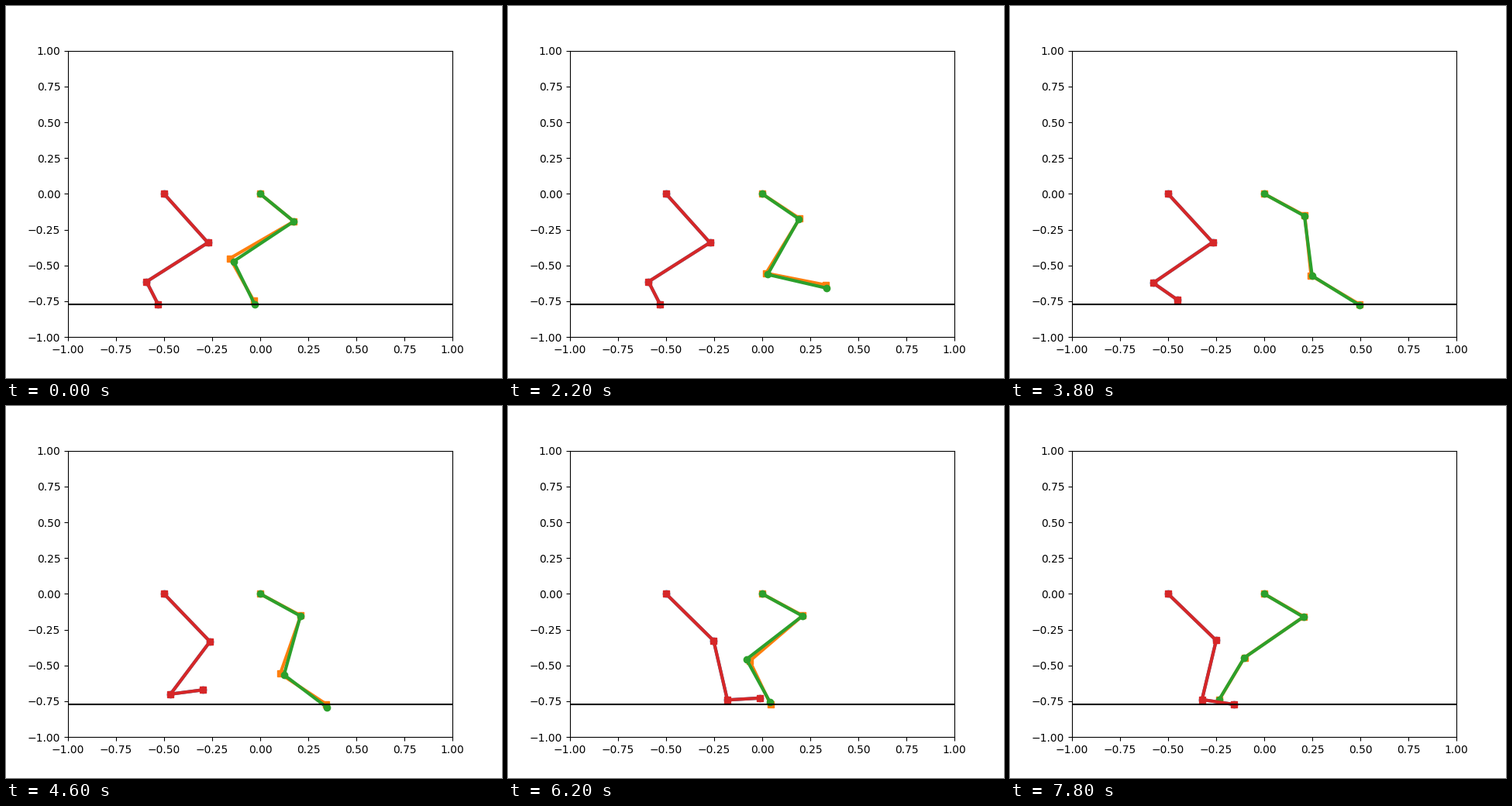
Write a matplotlib script that moves like this. It is 640 by 480 pixels and loops after 8 s.

```python
import numpy as np
import matplotlib.pyplot as plt
from matplotlib.animation import FuncAnimation

STEP = 200          # ms per frame
FRAMES = 40
GROUND = -0.77

FRONT_HIP, FRONT_LINKS = 0.0, (0.26, 0.42, 0.32)
HIND_HIP, HIND_LINKS = -0.5, (0.41, 0.42, 0.17)


def progress(t, start, end):
    return np.clip((t - start) / (end - start), 0, 1)


def smooth(u):
    return u * u * (3 - 2 * u)


def lift(t, start, end, height):
    return height * np.sin(np.pi * progress(t, start, end))


def front_foot(t):
    """Swing forward along an arc, then slide back on the ground."""
    swing = -0.034 + np.sin(0.186 * (t - 0.2))
    stance = 0.494 - 0.188 * (t - 3.8)
    return min(swing, stance), GROUND + lift(t, 0, 3.6, 0.143)


def fitted_foot(t):
    """The front foot with a small tracking error."""
    x, y = front_foot(t)
    sag = np.interp(t, (0.2, 2.2, 3.8, 4.5, 5.2, 6.2, 7.8),
                    (0.027, 0.022, 0.007, 0.025, 0.015, -0.017, 0))
    return x + 0.2 * sag, y - sag


def hind_foot(t):
    swing = -0.531 + np.sin(0.195 * max(t - 3.4, 0))
    stance = -0.157 - 0.188 * (t - 7.8)
    return min(swing, stance), GROUND - 0.002 + lift(t, 3.5, 6.6, 0.113)


def front_thigh(t, start=0.5, swing=12):
    return (-47.7 + swing * smooth(progress(t, start, 3.8))
            - 2 * smooth(progress(t, 6.2, 7.8)))


def fitted_thigh(t):
    return front_thigh(t, 0.8, 11.3)


def hind_thigh(t):
    return -56.2 + 3.8 * (1 - (1 - progress(t, 3.4, 7.8)) ** 2)


def solve(hip, links, thigh, foot):
    """Joints from hip to foot; the lower two links reach for the foot."""
    a, b, c = links
    hip = np.array([hip, 0.0])
    knee = hip + a * np.array([np.cos(thigh), np.sin(thigh)])
    dx, dy = foot - knee
    aim = np.arctan2(dy, dx)
    d = min(np.hypot(dx, dy), 0.98 * (b + c))
    shank = aim - np.arccos((d * d + b * b - c * c) / (2 * d * b))
    ankle = knee + b * np.array([np.cos(shank), np.sin(shank)])
    end = knee + d * np.array([np.cos(aim), np.sin(aim)])
    return np.array([hip, knee, ankle, end]).T


fig, ax = plt.subplots(figsize=(6.4, 4.8), dpi=100)
ax.set(xlim=(-1, 1), ylim=(-1, 1))

LEGS = [
    ("C0", "o", HIND_HIP, HIND_LINKS, hind_thigh, hind_foot),
    ("C1", "s", FRONT_HIP, FRONT_LINKS, front_thigh, front_foot),
    ("C2", "o", FRONT_HIP, FRONT_LINKS, fitted_thigh, fitted_foot),
    ("C3", "s", HIND_HIP, HIND_LINKS, hind_thigh, hind_foot),
]
lines = [ax.plot([], [], color=color, marker=marker, lw=3)[0]
         for color, marker, *_ in LEGS]
ax.plot([-1, 1], [GROUND, GROUND], color="black")


def update(frame):
    t = max(frame, 1) * STEP / 1000     # the first pose is held one step
    for line, (_, _, hip, links, thigh, foot) in zip(lines, LEGS):
        line.set_data(*solve(hip, links, np.radians(thigh(t)), foot(t)))
    return lines


anim = FuncAnimation(fig, update, frames=FRAMES, interval=STEP,
                     repeat=True, repeat_delay=0)
plt.show()
```
